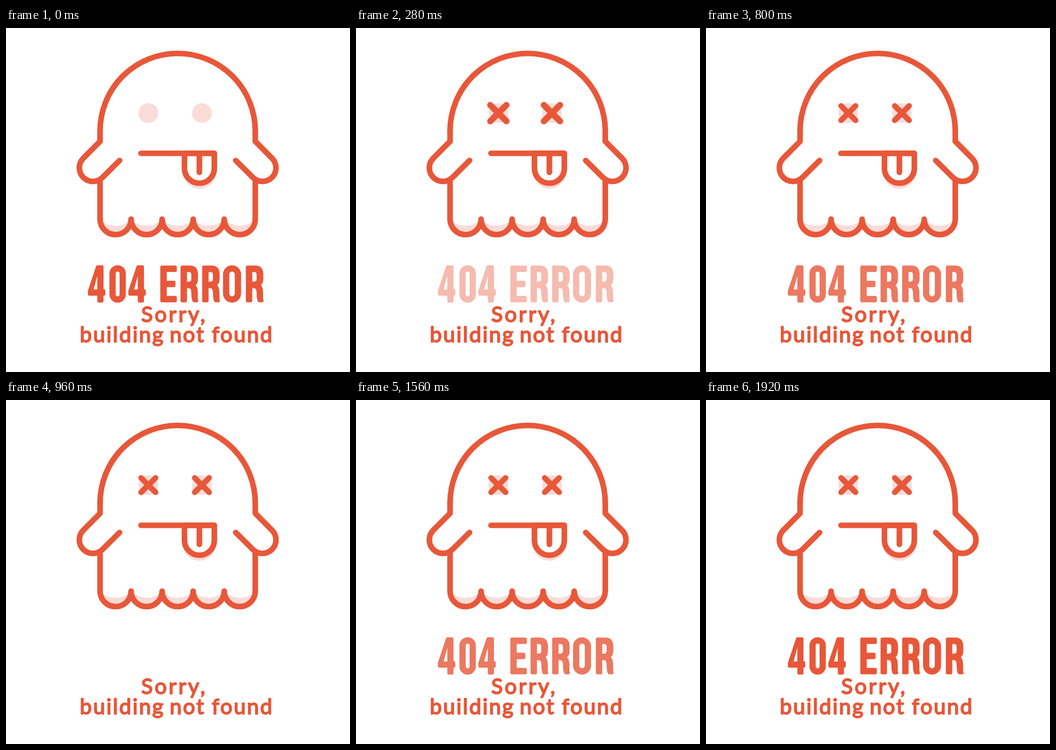
Animation, 748 px wide and 748 px high, one loop 2000 ms. Source, as an HTML page:

```html
<!DOCTYPE html>
<html lang="en">
<head>
<meta charset="utf-8">
<title>404 error</title>
<style>
  :root { --red: #e85739; --pale: #f9dcd8; }
  html, body { margin: 0; height: 100%; overflow: hidden; background: #fff; }
  svg { display: block; width: 100vw; height: 100vh; }

  .line { fill: none; stroke: var(--red); stroke-width: 12.2; stroke-linecap: round; stroke-linejoin: round; }
  .shade { fill: var(--pale); }

  .title { animation: blink 2s steps(5) infinite; }
  .solid { fill: var(--red); fill-rule: evenodd; stroke: var(--red); stroke-width: 7; stroke-linejoin: round; }
  .hole { fill: #fff; stroke: none; }
  .ring { fill: none; stroke: var(--red); stroke-width: 13.6; }

  .note {
    font: 400 46.5px Lato, sans-serif;
    letter-spacing: 2.9px;
    fill: var(--red);
    stroke: var(--red);
    stroke-width: 2.3;
    stroke-linejoin: round;
  }
  .wide { letter-spacing: 4.2px; }

  .cross { animation: pop 2s steps(5) infinite; }

  @keyframes blink {
    0%, 20%, 38%, 58%, 76%, 96%, 100% { opacity: 1; }
    10%, 48%, 86% { opacity: 0; }
  }
  @keyframes pop {
    0% { transform: scale(0); }
    10% { transform: scale(1.2); }
    20%, 100% { transform: scale(1); }
  }
</style>
</head>
<body>
<svg viewBox="0 0 748 748">
  <defs>
    <path id="scallop" d="M204.5 415.5a33.75 33.75 0 0 0 67.5 0a46.6 46.6 0 0 1-67.5 0z"/>
    <path id="arm" d="M204.5 224V246.5L168.1 283.1A29.5 29.5 0 0 0 209.9 324.9L247 288M204.5 330V415.5"/>
    <g id="four">
      <path d="M199 519.5H208.5V571.5H212.5V578.5H208.5V593.5H202V578.5H181.5V572Z"/>
      <path class="hole" d="M198.5 539V568.5H190.5Z"/>
    </g>
    <path id="r" d="M383 520H400Q414 520 414 536V546Q414 556 406 559Q413.5 562 413.5 574V585Q413.5 590 414.5 593H409Q406.5 590 406.5 576Q406.5 562 397 562H390V593H383ZM390 527V555H398Q406.5 555 406.5 545V537Q406.5 527 398 527Z"/>
  </defs>

  <!-- ghost body -->
  <g class="shade">
    <use href="#scallop"/>
    <use href="#scallop" x="67.5"/>
    <use href="#scallop" x="135"/>
    <use href="#scallop" x="202.5"/>
    <use href="#scallop" x="270"/>
  </g>
  <g class="line">
    <path d="M204.5 224A168.75 168.75 0 0 1 542 224"/>
    <use href="#arm"/>
    <use href="#arm" transform="translate(746.5) scale(-1 1)"/>
    <path d="M204.5 415.5a33.75 33.75 0 0 0 67.5 0a33.75 33.75 0 0 0 67.5 0a33.75 33.75 0 0 0 67.5 0a33.75 33.75 0 0 0 67.5 0a33.75 33.75 0 0 0 67.5 0"/>
  </g>

  <!-- face -->
  <g transform="translate(309.5 185)">
    <circle class="shade" r="21.5"/>
    <path class="line cross" d="M-15.7-15.7L15.7 15.7M15.7-15.7L-15.7 15.7"/>
  </g>
  <g transform="translate(426 185)">
    <circle class="shade" r="21.5"/>
    <path class="line cross" d="M-15.7-15.7L15.7 15.7M15.7-15.7L-15.7 15.7"/>
  </g>
  <circle class="shade" cx="420.5" cy="313.5" r="36"/>
  <path class="line" style="fill:#fff" d="M388 272.5V305A32.5 32.5 0 0 0 453 305V272.5Z"/>
  <path class="line" d="M293.5 272.5H453M420.5 272.5V314"/>

  <!-- headline lettering -->
  <g class="title" role="img" aria-label="404 ERROR">
    <g class="solid">
      <use href="#four"/>
      <use href="#four" x="88"/>
      <path d="M339 520H368V527H346V553H365V560H346V586H368V593H339Z"/>
      <use href="#r"/>
      <use href="#r" x="47"/>
      <use href="#r" x="142"/>
    </g>
    <g class="ring">
      <rect x="231.7" y="522.7" width="22.1" height="67.6" rx="11"/>
      <rect x="478.7" y="522.7" width="25.6" height="67.6" rx="12.8"/>
    </g>
  </g>

  <g class="note">
    <text class="wide" x="294" y="638.7">Sorry,</text>
    <text y="682.7"><tspan x="160.5">building </tspan><tspan x="356">not </tspan><tspan x="447.5">found</tspan></text>
  </g>
</svg>
</body>
</html>
```
